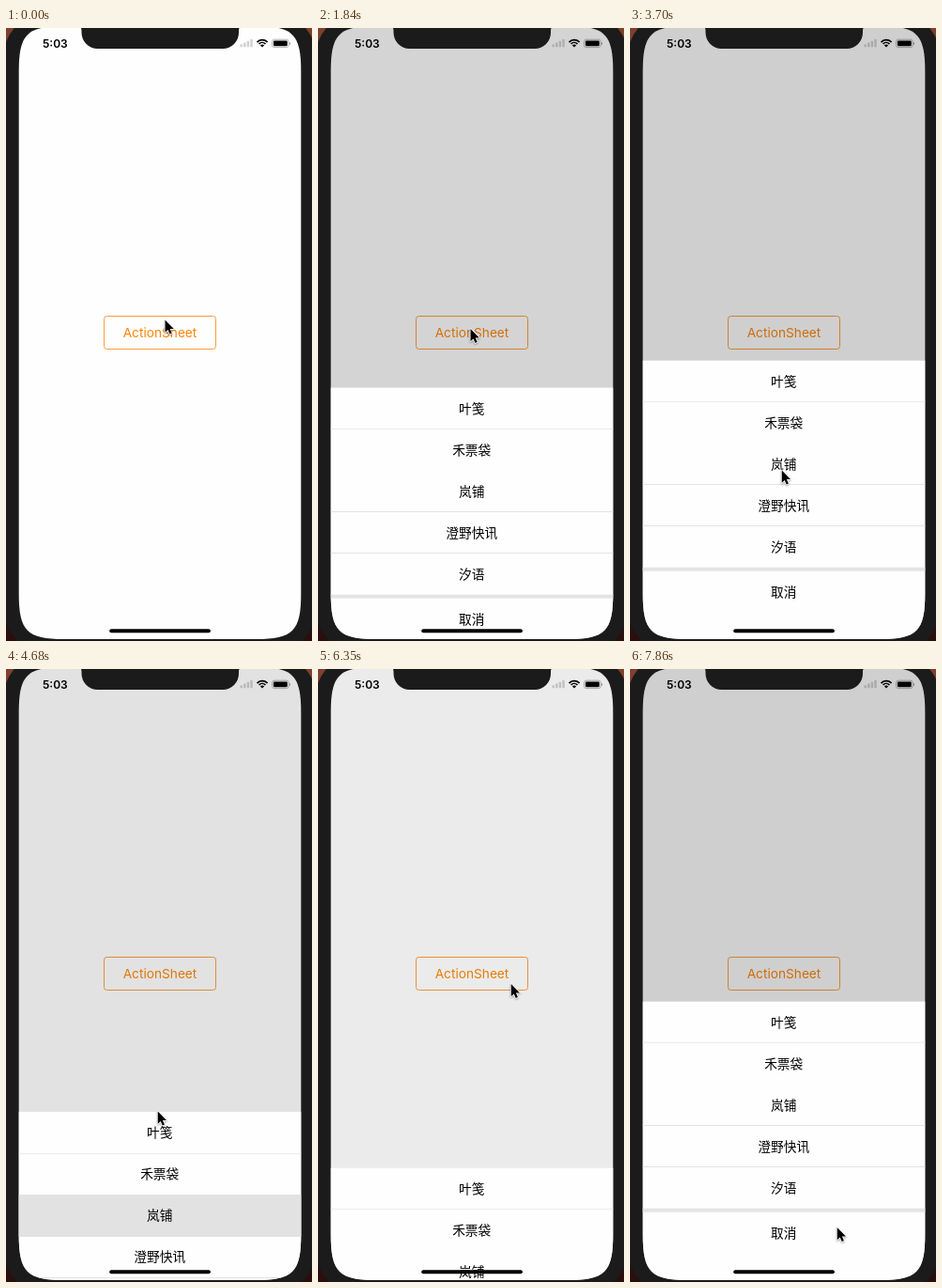
Animation, 326 px wide and 652 px high, one loop 8 s. Source, as an HTML page with a canvas:

```html
<!DOCTYPE html>
<html lang="zh">
<head>
<meta charset="utf-8">
<title>Action sheet</title>
<style>
html, body { margin: 0; width: 100%; height: 100%; overflow: hidden; background: #1b1b1b; }
canvas { display: block; width: 326px; height: 652px; }
</style>
</head>
<body>
<canvas id="stage"></canvas>
<script>
const W = 326, H = 652, LOOP = 8000;
const SCREEN = { left: 13.7, top: -2, right: 314.3, bottom: 650 };
const MID = 163.7, ROW = 44, SHEET = 296.3, DIM = 0.183;
const ITEMS = ['叶笺', '禾票袋', '岚铺', '澄野快讯', '汐语'];
const CJK = '13.7px "Noto Sans CJK SC", "Noto Sans CJK", sans-serif';
const ORANGE = '#fb8508', BEZEL = '#1b1b1b';

const canvas = document.getElementById('stage');
const dpr = window.devicePixelRatio || 1;
canvas.width = W * dpr;
canvas.height = H * dpr;
const ctx = canvas.getContext('2d');
ctx.scale(dpr, dpr);

const clamp = v => Math.max(0, Math.min(1, v));
const easeInOut = v => 0.5 - 0.5 * Math.cos(Math.PI * clamp(v));
const lastBefore = (t, times) => times.reduce((kept, s) => s <= t ? s : kept, -1);

function rect(x, y, w, h, color) {
  ctx.fillStyle = color;
  ctx.fillRect(x, y, w, h);
}

function roundRect(x, y, w, h, r, color) {
  ctx.beginPath();
  ctx.roundRect(x, y, w, h, r);
  ctx.fillStyle = color;
  ctx.fill();
}

function text(str, x, y, font, color, align = 'center') {
  ctx.font = font;
  ctx.fillStyle = color;
  ctx.textAlign = align;
  ctx.fillText(str, x, y);
}

// The sheet advances in visible steps, like a screen recording.
const OPENINGS = [
  { start: 1623, steps: [1670, 1750, 1840, 1930] },
  { start: 6231, steps: [6270, 6350, 6440, 6530] }
];

function sheetAmount(t) {
  if (t >= 4680 && t < 6270) return t < 4740 ? 0.604 : 0;
  const { start, steps } = OPENINGS[t < 4680 ? 0 : 1];
  return easeInOut((lastBefore(t, steps) - start) / 272);
}

// Each move: first and last step time, step count, end point, bend of the path in x.
const START = [169.5, 310.5];
const MOVES = [
  { from: 50, to: 110, steps: 2, end: [162, 319.5], bend: 165 },
  { from: 410, to: 410, steps: 1, end: [162.5, 320], bend: 162 },
  { from: 2650, to: 3340, steps: 13, end: [161.7, 472.5], bend: 168 },
  { from: 3640, to: 3700, steps: 2, end: [161.7, 470.5], bend: 161 },
  { from: 5370, to: 5970, steps: 11, end: [205.7, 335], bend: 180 },
  { from: 6890, to: 6890, steps: 1, end: [205.7, 334.5], bend: 205 },
  { from: 7070, to: 7860, steps: 15, end: [220.7, 594], bend: 254 }
];

function pointer(t) {
  let at = START;
  for (const { from, to, steps, end, bend } of MOVES) {
    if (t < from) break;
    const gap = (to - from) / (steps - 1) || 1;
    const done = Math.min(steps, Math.floor((t - from) / gap + 1e-6) + 1);
    const p = easeInOut(done / steps), q = 1 - p;
    at = [
      q * q * at[0] + 2 * p * q * bend + p * p * end[0],
      at[1] + (end[1] - at[1]) * p
    ];
    if (done < steps) break;
  }
  return at;
}

function drawBody() {
  const wall = ctx.createLinearGradient(0, 0, 0, H);
  wall.addColorStop(0, '#80402d');
  wall.addColorStop(1, '#2a0d0e');
  rect(0, 0, W, H, wall);
  roundRect(-3.5, -19, 335, 686, 53, BEZEL);
}

// Screen outline with continuous-curvature corners.
function screenPath() {
  const { left, top, right, bottom } = SCREEN;
  const reach = 48, handle = reach * 0.18;
  const corner = (x, y, dx, dy, leaving) => {
    const side = d => [x, y + dy * d], flat = d => [x + dx * d, y];
    const [a, b] = leaving ? [side, flat] : [flat, side];
    ctx.lineTo(...a(reach));
    ctx.bezierCurveTo(...a(handle), ...b(handle), ...b(reach));
  };
  ctx.beginPath();
  corner(left, top, 1, 1, true);
  corner(right, top, -1, 1, false);
  corner(right, bottom, -1, -1, true);
  corner(left, bottom, 1, -1, false);
  ctx.closePath();
}

function drawStatusBar() {
  text('5:03', 39, 20.8, '600 12px Inter, sans-serif', '#000', 'left');
  for (let i = 0; i < 4; i++) {
    const h = 3 + i * 1.8;
    roundRect(249.5 + i * 3.6, 20.3 - h, 2.4, h, 0.6, '#d0d0d0');
  }
  ctx.strokeStyle = '#000';
  ctx.lineWidth = 1.7;
  for (const r of [4.7, 7.5]) {
    ctx.beginPath();
    ctx.arc(273, 20.2, r, -Math.PI * 0.76, -Math.PI * 0.24);
    ctx.stroke();
  }
  ctx.beginPath();
  ctx.moveTo(273, 20.4);
  ctx.arc(273, 20.4, 2.8, -Math.PI * 0.76, -Math.PI * 0.24);
  ctx.fillStyle = '#000';
  ctx.fill();

  ctx.beginPath();
  ctx.roundRect(283.5, 12.2, 17.6, 8.4, 2.2);
  ctx.strokeStyle = '#a5a5a5';
  ctx.lineWidth = 0.8;
  ctx.stroke();
  roundRect(284.9, 13.5, 14.8, 5.8, 1.1, '#000');
  roundRect(301.8, 15, 1.1, 3, 0.6, '#a5a5a5');
}

function drawButton() {
  ctx.beginPath();
  ctx.roundRect(104.5, 306.5, 119, 35, 3);
  ctx.strokeStyle = ORANGE;
  ctx.lineWidth = 0.8;
  ctx.stroke();
  text('ActionSheet', 164, 328.7, '13.7px Inter, sans-serif', ORANGE);
}

function drawSheet(amount, selected) {
  const top = SCREEN.bottom - SHEET * amount;
  const gapY = top + ROW * ITEMS.length;
  rect(0, top, W, SHEET, '#fefefe');
  ITEMS.forEach((label, i) => {
    const y = top + i * ROW;
    if (selected === i) rect(0, Math.round(y), W, ROW, '#e2e2e2');
    if (i && i !== 2) rect(0, Math.floor(y), W, 1, i === 1 ? '#ececec' : '#e3e3e3');
    text(label, MID, y + 27, CJK, '#000');
  });
  rect(0, gapY, W, 4, '#e4e4e4');
  text('取消', MID, gapY + 31.3, CJK, '#000');
}

function drawNotch() {
  ctx.beginPath();
  ctx.moveTo(76, -4);
  ctx.quadraticCurveTo(80.5, -2, 80.5, 3);
  ctx.arcTo(80.5, 22, 100, 22, 17);
  ctx.arcTo(248, 22, 248, 3, 17);
  ctx.lineTo(248, 3);
  ctx.quadraticCurveTo(248, -2, 252.5, -4);
  ctx.fillStyle = BEZEL;
  ctx.fill();
}

function drawPointer([x, y]) {
  const outline = [[0, 0], [0, 13.2], [3, 10.4], [5, 15], [7.2, 14], [5.2, 9.6], [9.3, 9.4]];
  ctx.save();
  ctx.translate(x, y);
  ctx.beginPath();
  outline.forEach(p => ctx.lineTo(...p));
  ctx.closePath();
  ctx.shadowColor = 'rgba(0,0,0,.35)';
  ctx.shadowBlur = 2 * dpr;
  ctx.shadowOffsetY = dpr;
  ctx.strokeStyle = '#fff';
  ctx.lineWidth = 1.6;
  ctx.lineJoin = 'round';
  ctx.stroke();
  ctx.shadowColor = 'transparent';
  ctx.fillStyle = '#000';
  ctx.fill();
  ctx.restore();
}

function draw(t) {
  const amount = sheetAmount(t);
  drawBody();
  ctx.save();
  screenPath();
  ctx.clip();
  rect(0, 0, W, H, '#fefefe');
  drawStatusBar();
  drawButton();
  if (amount > 0) {
    rect(0, 0, W, H, `rgba(0,0,0,${DIM * amount})`);
    drawSheet(amount, t >= 4540 && t < 4740 ? 2 : -1);
  }
  roundRect(110.2, 639.2, 107.7, 4, 2, '#000');
  drawNotch();
  ctx.restore();
  drawPointer(pointer(t));
}

const began = performance.now();
function tick() {
  draw((performance.now() - began) % LOOP);
  requestAnimationFrame(tick);
}
tick();
</script>
</body>
</html>
```
